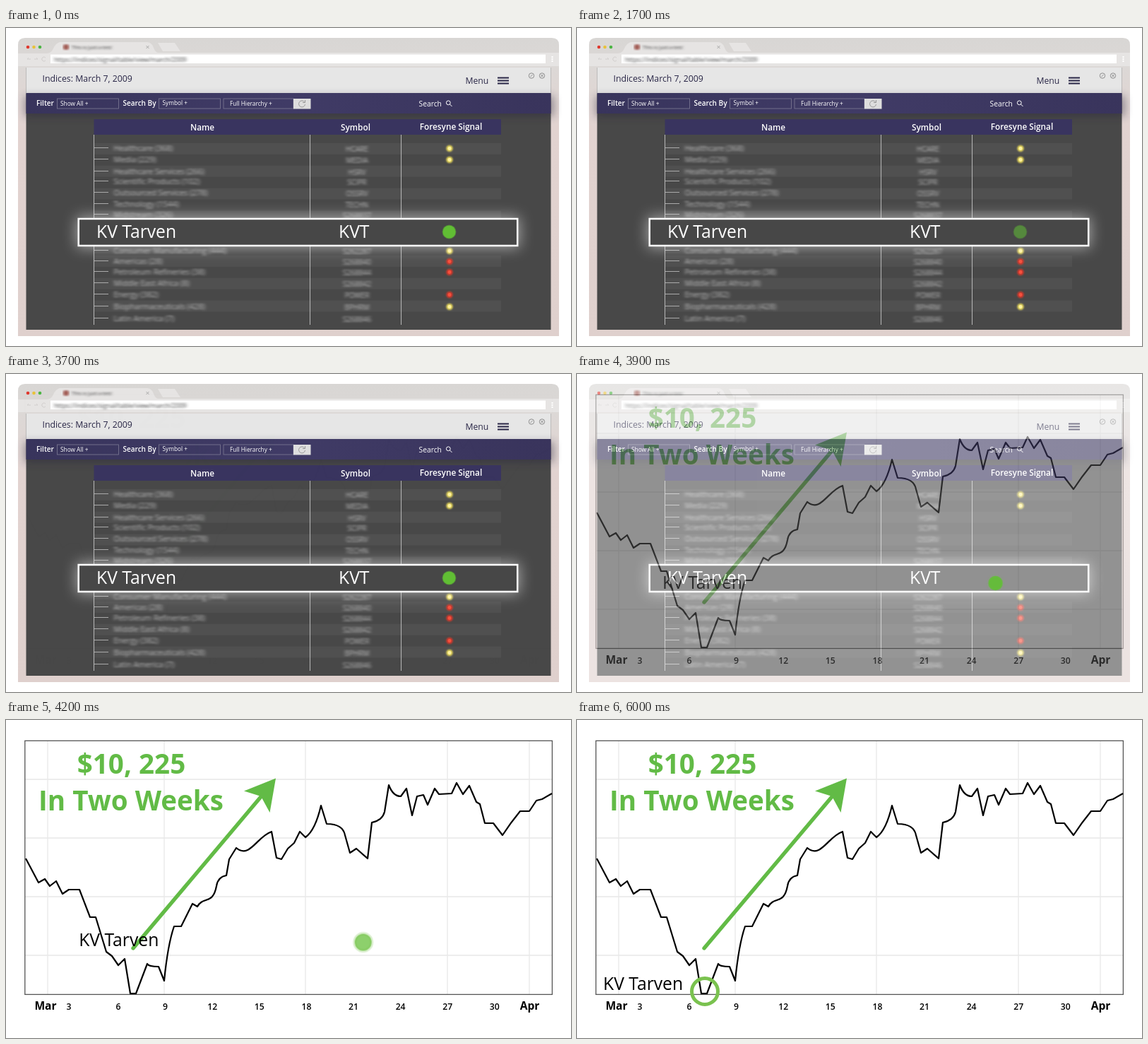
Recreate the animation shown at these times as an HTML page. Size 800 by 450 pixels, loop 6.1 s.

```html
<!DOCTYPE html>
<html lang="en">
<head>
<meta charset="utf-8">
<title>Index signal</title>
<style>
html, body { margin: 0; width: 100%; height: 100%; overflow: hidden; background: #fff; }
svg { display: block; width: 100vw; height: 100vh; font-family: "Open Sans", "Noto Sans", sans-serif; }
.mid { text-anchor: middle; }
.semi { font-weight: 600; }
.big { font-size: 24.7px; }
.small { font-size: 8.3px; }

/* 60.656% = 3.7 s, 68.852% = 4.2 s, 91.803% = 5.6 s */
#app, #caption, #marker, #fill, #ring { animation: 6.1s linear infinite; }
#app { animation-name: dissolve; }
#caption { animation-name: caption; }
#marker { animation-name: marker; }
#fill { animation-name: pulse, grow; }
#ring { animation-name: appear, grow; }
@keyframes dissolve {
  0%, 60.656% { opacity: 1; }
  68.852%, 100% { opacity: 0; }
}
@keyframes caption {
  0%, 60.656% { transform: translate(128px, 297px); animation-timing-function: cubic-bezier(.25,.1,.62,1); }
  91.803%, 100% { transform: translate(37px, 382px); }
}
@keyframes marker {
  0%, 60.656% { transform: translate(627.5px, 288.5px); animation-timing-function: cubic-bezier(.25,.1,.62,1); }
  91.803%, 100% { transform: translate(181px, 384px); }
}
@keyframes grow {
  0%, 60.656% { r: 9.5px; animation-timing-function: cubic-bezier(.25,.1,.62,1); }
  91.803%, 100% { r: 18.5px; }
}
@keyframes pulse {
  0% { opacity: 1; animation-timing-function: ease-in-out; }
  29% { opacity: .55; animation-timing-function: ease-in-out; }
  58% { opacity: 1; }
  60.656% { opacity: 1; animation-timing-function: cubic-bezier(.25,.1,.62,1); }
  91.803%, 100% { opacity: 0; }
}
@keyframes appear {
  0%, 60.656% { opacity: 0; animation-timing-function: cubic-bezier(.25,.1,.62,1); }
  91.803%, 100% { opacity: 1; }
}
</style>
</head>
<body>
<svg viewBox="0 0 800 450">
  <defs>
    <linearGradient id="frame" x2="0" y2="1">
      <stop offset="0" stop-color="#d8d6d4"/>
      <stop offset=".1" stop-color="#dcd8d6"/>
      <stop offset=".3" stop-color="#e2d3d0"/>
      <stop offset="1" stop-color="#dfd0cd"/>
    </linearGradient>
    <linearGradient id="nav">
      <stop offset="0" stop-color="#38345c"/>
      <stop offset=".5" stop-color="#403b66"/>
      <stop offset="1" stop-color="#39345c"/>
    </linearGradient>
    <filter id="smear" x="-10%" y="-10%" width="120%" height="120%"><feGaussianBlur stdDeviation="2.3 1"/></filter>
    <filter id="soft" filterUnits="userSpaceOnUse" x="0" y="0" width="800" height="450"><feGaussianBlur stdDeviation="6"/></filter>
    <filter id="glow" filterUnits="userSpaceOnUse" x="0" y="200" width="800" height="180"><feGaussianBlur stdDeviation="10"/></filter>
    <filter id="halo" filterUnits="userSpaceOnUse" x="600" y="150" width="60" height="260"><feGaussianBlur stdDeviation="1.2"/></filter>
  </defs>

  <g id="chart">
    <path d="M59 30V388M224 30V388M424 30V388M625 30V388M741 30V388M27 84H773M27 167H773M27 250H773M27 333H773" stroke="#e8e8e8" stroke-width="1.3"/>
    <rect x="26.8" y="29.4" width="746.6" height="359" fill="none" stroke="#555" stroke-width="1.3"/>
    <path fill="none" stroke="#000" stroke-width="2.2" stroke-linejoin="round" d="M28 196L46 230 55 225 62 235 71 228 80 246 89 240H104L119 279H127L142 328 150 334 159 347 168 338 176 387H184L200 345Q202 349 216 349L224 369Q229 318 238 292H248L264 260 271 264C279 249 293 262 298 235Q300 222 312 220L316 197 326 181C345 197 355 165 376 158L383 195 390 197 399 182 408 174 416 158 424 166Q438 156 446 121L454 147Q477 147 480 163L487 188 496 182 512 196 518 145Q533 142 536 130L542 92Q548 108 559 108L567 97 575 135 582 108 591 106 597 120 607 97 613 105 631 104 638 89 647 105 656 93 666 116 671 119 678 146H690L703 163Q714 146 728 129H741L751 114 759 112 773 104"/>
    <g fill="#62bb46">
      <path d="M180 323L364 105" stroke="#62bb46" stroke-width="5.4" stroke-linecap="round"/>
      <path d="M337 100.5L382 82.500 373.500 131 361 108Z"/>
      <g class="mid" font-size="38.6" font-weight="700">
        <text x="177.500" y="75.500">$10, 225</text>
        <text x="177" y="128">In Two Weeks</text>
      </g>
    </g>
    <g id="days" class="mid semi" font-size="12.2"></g>
    <g class="mid" font-size="15.6" font-weight="700">
      <text x="56" y="410">Mar</text>
      <text x="741.500" y="410">Apr</text>
    </g>
    <text id="caption" class="big">KV Tarven</text>
  </g>

  <g id="app">
    <rect width="800" height="450" fill="#fff"/>
    <path d="M17 436V24Q17 14 27 14H773Q783 14 783 24V436Z" fill="url(#frame)"/>
    <path d="M17 36H58Q64 36 67 29T76 20H200Q206 20 209 28T217 35H783V54H17Z" fill="#e6e4e3"/>
    <path d="M215 21H239L247 33H222Z" fill="#e6e4e3"/>
    <circle cx="31" cy="27" r="2.300" fill="#e0392f"/>
    <circle cx="39.500" cy="27" r="2.300" fill="#e8c23a"/>
    <circle cx="48" cy="27" r="2.300" fill="#4bb543"/>
    <circle cx="85" cy="27" r="4" fill="#9c5148" filter="url(#smear)"/>
    <path d="M198.500 25L202.500 29M202.500 25L198.500 29" stroke="#aaa"/>
    <path d="M35 44H30L32 42M40 44H45L43 42M56 42A3 3 0 1 0 56 46" fill="none" stroke="#d2cfce"/>
    <rect x="63" y="37.500" width="701" height="12.500" fill="#fff"/>
    <path d="M773.500 40V48" stroke="#fff" stroke-width="2" stroke-dasharray="2 1"/>
    <g filter="url(#smear)" fill="#444">
      <text x="93" y="29.500" font-size="7.400">This is just a test</text>
      <text x="68" y="47.500" font-size="9">https://indices/signal/table/view/march/2009</text>
    </g>

    <rect x="28.500" y="56" width="743" height="371" fill="#484848"/>
    <rect x="28.500" y="56" width="743" height="37" fill="#e6e6e6"/>
    <rect x="26" y="96" width="750" height="29" fill="#252238" opacity=".4" filter="url(#soft)"/>
    <rect x="28.500" y="92" width="743" height="29" fill="url(#nav)"/>
    <g fill="#2a2747">
      <text x="51.500" y="76" font-size="12.300">Indices: March 7, 2009</text>
      <text x="650.500" y="79" font-size="12.200">Menu</text>
      <path d="M696 70.500H712M696 74.500H712M696 78.500H712" stroke="#2a2747" stroke-width="1.900"/>
    </g>
    <g fill="none" stroke="#777" stroke-width=".8">
      <circle cx="744" cy="67.500" r="3.700"/>
      <circle cx="759" cy="67.500" r="3.700"/>
      <path d="M742.500 69L745.500 66M757.300 65.800L760.700 69.200M760.700 65.800L757.300 69.200"/>
    </g>
    <g fill="none" stroke="#77738f" stroke-width=".9">
      <rect x="72.500" y="100" width="87" height="14"/>
      <rect x="216.500" y="100" width="87" height="14"/>
      <rect x="308" y="100" width="99" height="14"/>
    </g>
    <rect x="407" y="100" width="24.500" height="14.500" fill="#dedede"/>
    <path d="M422.500 104.500A4.500 4.500 0 1 0 423.500 108M423.500 102V105.500H420" fill="none" stroke="#999" stroke-width="1"/>
    <g fill="#fff">
      <g class="semi" font-size="10">
        <text x="43" y="110">Filter</text>
        <text x="165.500" y="110">Search By</text>
      </g>
      <g class="small">
        <text x="77" y="109.500">Show All +</text>
        <text x="221.500" y="109">Symbol +</text>
        <text x="317" y="109.500">Full Hierarchy +</text>
      </g>
      <text x="584.500" y="110.500" font-size="10.300">Search</text>
    </g>
    <path d="M628.500 108L631.500 111" stroke="#fff"/>
    <circle cx="626.300" cy="105.800" r="2.900" fill="none" stroke="#fff"/>

    <g id="bands" fill="#505050"></g>
    <rect x="124.500" y="129" width="576.500" height="22" fill="#39345f"/>
    <g class="mid semi" font-size="11.800" fill="#fff">
      <text x="278" y="145">Name</text>
      <text x="495" y="145">Symbol</text>
      <text x="630" y="144">Foresyne Signal</text>
    </g>
    <g id="rows" fill="#bdbdbd" font-size="11" filter="url(#smear)"></g>
    <path d="M124.500 151V420M430.500 151V420M559.500 151V420" stroke="#b8b8b8"/>
    <path id="ticks" stroke="#aaa"/>
    <g id="lights"></g>

    <rect x="100" y="267" width="627" height="44" fill="#fff" opacity=".5" filter="url(#glow)"/>
    <rect x="102.700" y="270" width="621.500" height="38" fill="#474747" stroke="#fff" stroke-width="2.500"/>
    <g class="big" fill="#fff">
      <text x="128" y="297">KV Tarven</text>
      <text x="471" y="297">KVT</text>
    </g>
  </g>

  <g id="marker">
    <circle id="fill" r="9.500" fill="#62bf35"/>
    <circle id="ring" r="9.500" fill="none" stroke="#7ac24f" stroke-width="5"/>
  </g>
</svg>
<script>
const get = id => document.getElementById(id);
const add = (id, markup) => get(id).insertAdjacentHTML("beforeend", markup);

// y, name, symbol, light
const rows = [
  [170, "Healthcare (368)", "HCARE", "y"],
  [186, "Media (229)", "MEDIA", "y"],
  [203, "Healthcare Services (266)", "HSRV"],
  [217, "Scientific Products (102)", "SCIPR"],
  [233, "Outsourced Services (278)", "OSSRV"],
  [249, "Technology (1544)", "TECHN"],
  [264, "Midstream (326)", "S268837"],
  [315, "Consumer Manufacturing (444)", "S262287", "y"],
  [330, "Americas (28)", "S268840", "r"],
  [345, "Petroleum Refineries (38)", "S268844", "r"],
  [361, "Middle East Africa (8)", "S268842"],
  [377, "Energy (382)", "POWER", "r"],
  [394, "Biopharmaceuticals (428)", "BPHRM", "y"],
  [411, "Latin America (7)", "S268846"]
];
const colors = { y: ["#e8d95c", "#fff3a0"], r: ["#d8392b", "#f4523f"] };

for (const [y, name, symbol, light] of rows) {
  add("rows", `<text x="152.5" y="${y + 3.5}">${name}</text><text x="497" y="${y + 5}" class="mid" font-size="10">${symbol}</text>`);
  if (light) {
    const [outer, inner] = colors[light];
    add("lights", `<circle cx="628" cy="${y + .5}" r="4.6" fill="${outer}" filter="url(#halo)"/><circle cx="628" cy="${y + .5}" r="2.4" fill="${inner}"/>`);
  }
}
get("ticks").setAttribute("d", rows.map(r => `M125 ${r[0] - .5}H145`).join(""));

for (let i = 0; i < 16; i += 2)
  add("bands", `<rect x="125" y="${163 + i * 15.9}" width="576" height="15.9"/>`);

for (let day = 3; day <= 30; day += 3)
  add("days", `<text x="${day === 3 ? 89 : 159 + (day - 6) * 22.2}" y="409.5">${day}</text>`);
</script>
</body>
</html>
```
